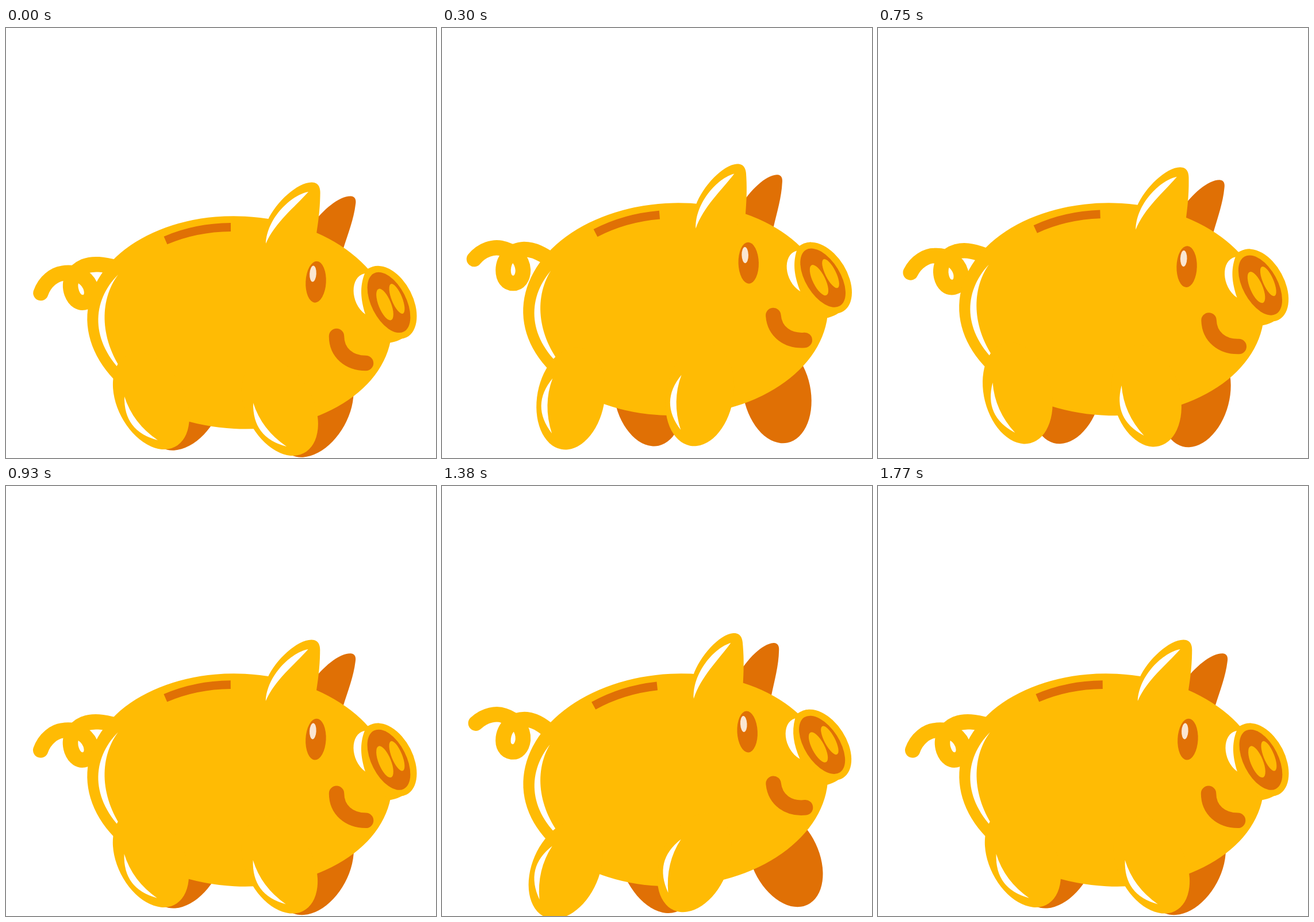
Recreate the animation shown at these times as an HTML page with a canvas. Size 748 by 748 pixels, loop 1800 ms.

```html
<!DOCTYPE html>
<html lang="en">
<head>
<meta charset="utf-8">
<title>Walking piggy bank</title>
<style>
  html, body { margin: 0; width: 100%; height: 100%; overflow: hidden; background: #fff; }
  canvas { display: block; width: 748px; height: 748px; }
</style>
</head>
<body>
<canvas id="stage" width="748" height="748"></canvas>
<script>
const ctx = document.getElementById('stage').getContext('2d');
const GOLD = '#ffbb04', DARK = '#e07005', WHITE = '#fff', CREAM = '#fae6d2';
const LOOP = 1800, STEP = 30, STRIDE = 900, BOB = 450;
const CX = 405, CY = 512;
const rad = d => d * Math.PI / 180;
const smooth = p => p * p * (3 - 2 * p);

// 0 -> 1 -> 0 over one period
const pingPong = (t, period) => 1 - Math.abs((t % period) / (period / 2) - 1);

// cubic-bezier(x1, 0, x2, 1)
function ease(p, x1, x2) {
  let lo = 0, hi = 1;
  for (let i = 0; i < 30; i++) {
    const s = (lo + hi) / 2, r = 1 - s;
    if (3 * s * r * r * x1 + 3 * s * s * r * x2 + s * s * s < p) lo = s; else hi = s;
  }
  return smooth(lo);
}

function fill(d, color) {
  ctx.fillStyle = color;
  ctx.fill(new Path2D(d));
}

function stroke(d, width, color, cap) {
  ctx.lineWidth = width;
  ctx.lineCap = cap;
  ctx.lineJoin = 'round';
  ctx.strokeStyle = color;
  ctx.stroke(new Path2D(d));
}

function oval(x, y, rx, ry, tilt, color) {
  ctx.fillStyle = color;
  ctx.beginPath();
  ctx.ellipse(x, y, rx, ry, rad(tilt), 0, 2 * Math.PI);
  ctx.fill();
}

// Draw with the origin at a joint of the body
function joint(x, y, angle, draw) {
  ctx.save();
  ctx.translate(x, y);
  ctx.rotate(rad(angle));
  draw();
  ctx.restore();
}

function leg(x, y, angle, color, shine) {
  joint(x, y, angle, () => {
    oval(0, 55, 58.5, 90, 0, color);
    if (shine) fill('M-37.6 26.7 Q-67 80 -21.2 120.9 Q-46 75 -37.6 26.7Z', WHITE);
  });
}

function tail(angle) {
  joint(203.3, 436.9, angle, () => {
    ctx.translate(-198.2, -429.4);
    stroke('M56 402 C70 385 90 380 103 383 C125 387 140 402 141 421 ' +
      'C141 435 134 444 124 444 C113 444 106.5 435 106.5 421 ' +
      'C107 400 122 386 143 385 C160 385 175 393 195 407', 26.5, GOLD, 'round');
  });
}

function ears() {
  fill('M455 335 C470 302 508 268 532 268.5 C545 269 547.5 279 546.5 292 ' +
    'C546 318 543 338 540 358 L500 400 Z', GOLD);
  fill('M526 285 C497 290 454 330 452 375 C468 338 502 312 526 285Z', WHITE);
}

function eye(open) {
  ctx.save();
  ctx.translate(539, 441.7);
  ctx.scale(1, open);
  oval(0, 0, 17.7, 36, 3, DARK);
  oval(-5, -14.2, 5.8, 14, 3, CREAM);
  ctx.restore();
}

function snout() {
  oval(666, 477.5, 42, 68, -27, GOLD);
  fill('M700 531 Q688 545 665 548 L610 470 L629 419 Q640 413 650 414Z', GOLD);
  oval(666, 477.5, 30.3, 57, -27, DARK);
  oval(659, 481, 10.8, 29.2, -22, GOLD);
  oval(680, 471, 9.2, 27.7, -22, GOLD);
  fill('M624 427 C598 432 598 478 625 498 C617 472 615 450 624 427Z', WHITE);
}

function draw(t) {
  const swing = smooth(pingPong(t, STRIDE));
  const lift = 27 * ease(pingPong(t, BOB), 0.45, 0.41);
  const open = 0.11 + 0.89 * smooth(Math.min(1, Math.abs(t - 1200) / 120));
  const near = -27.5 + 57.4 * swing;
  const far = 29 - 49.1 * swing;

  ctx.fillStyle = WHITE;
  ctx.fillRect(0, 0, 748, 748);
  ctx.save();
  ctx.translate(CX, CY - lift);
  ctx.rotate(rad(-5.9 * swing));
  ctx.translate(-CX, -CY);

  leg(340, 603, far, DARK);
  leg(564, 615, far, DARK);
  fill('M530 345 C552 315 580 292 600 292.5 C608 293 609.5 300 608 307 ' +
    'C605 332 595 358 587 383 L560 400Z', DARK);
  tail(-20.5 + 33.6 * swing);

  oval(406.3, 512.4, 265.2, 184.9, 3, GOLD);
  fill('M195 429 C149 475 145 545 208 604 C163 545 161 475 195 429Z', WHITE);
  stroke('M277.5 369.5 Q330 347 391 346.5', 14.8, DARK, 'butt');
  ears();
  snout();
  eye(open);
  stroke('M575 536 C575 565 597 583 626 583', 26.5, DARK, 'round');

  leg(227, 600, near, GOLD, true);
  leg(451, 611, near, GOLD, true);
  ctx.restore();
}

const start = performance.now();
function tick() {
  const t = Math.max(0, performance.now() - start) % LOOP;
  draw(Math.floor(t / STEP) * STEP);
  requestAnimationFrame(tick);
}
tick();
</script>
</body>
</html>
```
